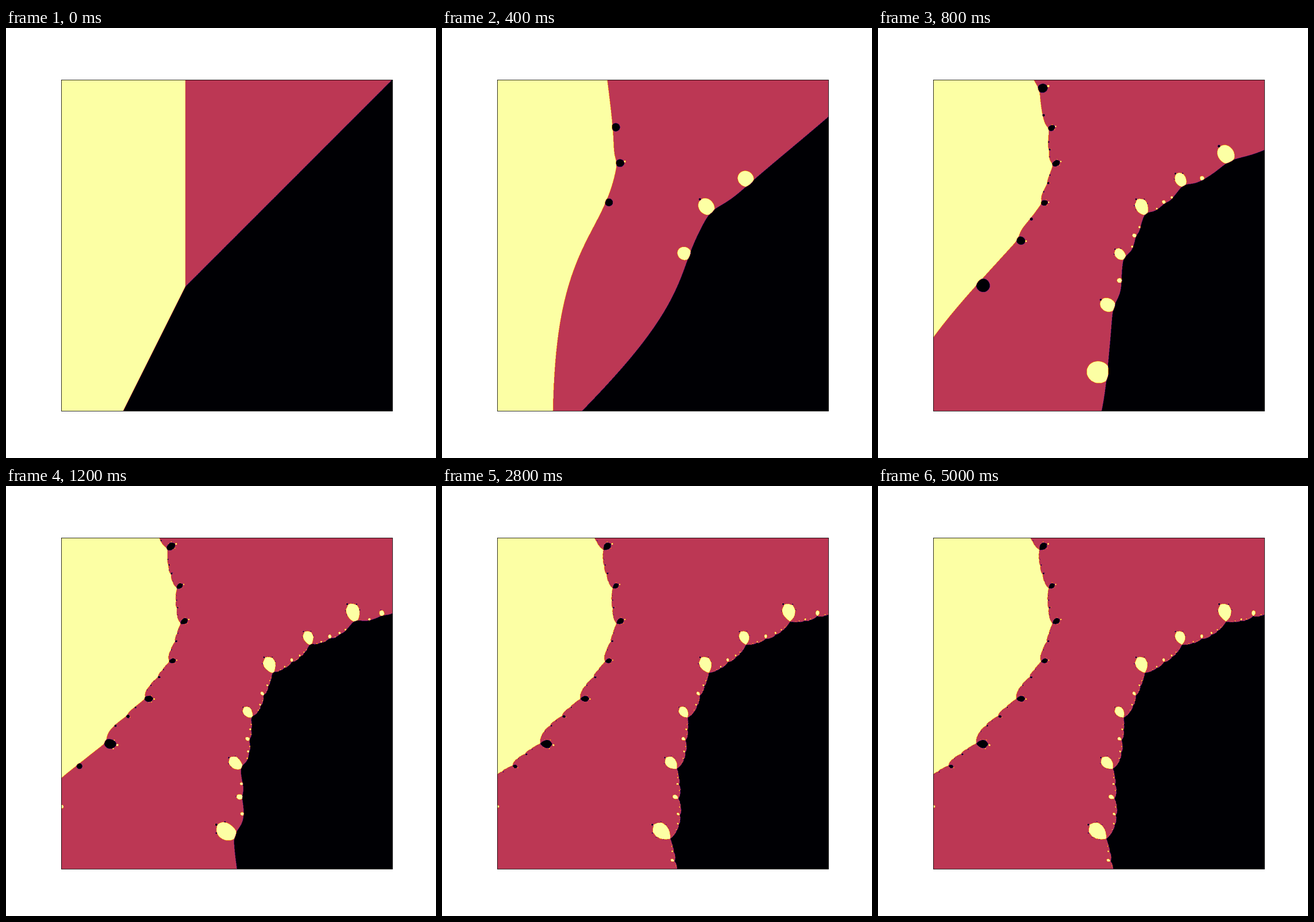
An HTML page with a canvas for the animation above (6 s loop, 748 px wide and 748 px high).

```html
<!DOCTYPE html>
<html lang="en">
<head>
<meta charset="utf-8">
<title>Newton fractal</title>
<style>
  html, body { margin: 0; width: 100%; height: 100%; overflow: hidden; background: #fff; }
  canvas { display: block; }
</style>
</head>
<body>
<canvas id="stage" width="748" height="748"></canvas>
<script>
const STEP_MS = 200, LOOP_MS = 6000, LAST_STEP = 25;
const GRID = 1000, SIZE = 576, LEFT = 96, TOP = 90;

// Roots of the cubic, each with its value on the colour scale.
const roots = [
  { x: 1, y: 0, value: 0 },
  { x: 0, y: 1, value: 0.5 },
  { x: -1, y: 1, value: 1 }
];

const stops = ["000004", "210c4a", "57106e", "8a226a", "bc3754", "e35933", "f98e09", "f9cb35", "fcffa4"]
  .map(hex => [0, 2, 4].map(i => parseInt(hex.slice(i, i + 2), 16)));

const palette = Array.from({ length: 257 }, (_, i) => {
  const pos = i / 32, low = Math.min(7, Math.floor(pos)), mix = pos - low;
  return stops[low].map((c, k) => Math.round(c + (stops[low + 1][k] - c) * mix));
});

// Orbit of every grid point; only unsettled points keep moving.
const zx = new Float64Array(GRID * GRID);
const zy = new Float64Array(GRID * GRID);
const values = new Float32Array(GRID * GRID);
let active = new Uint32Array(GRID * GRID);
for (let i = 0; i < active.length; i++) {
  active[i] = i;
  zx[i] = -2 + 4 * (i % GRID) / (GRID - 1);
  zy[i] = 2 - 4 * Math.floor(i / GRID) / (GRID - 1);
}

// Give each point the value of its nearest root and drop those close to one.
function classify() {
  let kept = 0;
  for (let a = 0; a < active.length; a++) {
    const i = active[a];
    let best = Infinity;
    for (let k = 0; k < 3; k++) {
      const r = roots[k], dx = zx[i] - r.x, dy = zy[i] - r.y, d = dx * dx + dy * dy;
      if (d < best) { best = d; values[i] = r.value; }
    }
    if (best > 0.01) active[kept++] = i;
  }
  active = active.subarray(0, kept);
}

// One Newton step: z - p/p', where p'/p is the sum of 1/(z - root).
function advance() {
  for (let a = 0; a < active.length; a++) {
    const i = active[a];
    let sx = 0, sy = 0;
    for (let k = 0; k < 3; k++) {
      const r = roots[k], dx = zx[i] - r.x, dy = zy[i] - r.y, d = dx * dx + dy * dy;
      sx += dx / d;
      sy -= dy / d;
    }
    const s = sx * sx + sy * sy;
    zx[i] -= sx / s;
    zy[i] += sy / s;
  }
}

// Hann-window weights for shrinking the grid to the plot size.
const ratio = GRID / SIZE;
const taps = Array.from({ length: SIZE }, (_, p) => {
  const centre = (p + 0.5) * ratio - 0.5;
  const first = Math.max(0, Math.ceil(centre - ratio));
  const last = Math.min(GRID - 1, Math.floor(centre + ratio));
  const weights = [];
  for (let i = first; i <= last; i++) {
    weights.push(0.5 + 0.5 * Math.cos(Math.PI * (i - centre) / ratio));
  }
  const total = weights.reduce((a, b) => a + b);
  return { first, weights: weights.map(w => w / total) };
});

const rows = new Float32Array(GRID * SIZE);

function renderPlot() {
  for (let y = 0; y < GRID; y++) {
    for (let x = 0; x < SIZE; x++) {
      const { first, weights } = taps[x];
      let sum = 0;
      for (let k = 0; k < weights.length; k++) sum += weights[k] * values[y * GRID + first + k];
      rows[y * SIZE + x] = sum;
    }
  }
  const image = new ImageData(SIZE, SIZE);
  for (let y = 0, out = 0; y < SIZE; y++) {
    const { first, weights } = taps[y];
    for (let x = 0; x < SIZE; x++, out += 4) {
      let sum = 0;
      for (let k = 0; k < weights.length; k++) sum += weights[k] * rows[(first + k) * SIZE + x];
      const colour = palette[Math.round(sum * 256)];
      image.data[out] = colour[0];
      image.data[out + 1] = colour[1];
      image.data[out + 2] = colour[2];
      image.data[out + 3] = 255;
    }
  }
  return image;
}

const plots = [];

function plotAt(step) {
  while (plots.length <= step) {
    if (plots.length) advance();
    classify();
    plots.push(renderPlot());
  }
  return plots[step];
}

const ctx = document.getElementById("stage").getContext("2d");
let shown = -1;

function draw(time) {
  const step = Math.min(LAST_STEP, Math.floor((time % LOOP_MS) / STEP_MS));
  if (step === shown) return;
  shown = step;
  ctx.fillStyle = "#fff";
  ctx.fillRect(0, 0, 748, 748);
  ctx.putImageData(plotAt(step), LEFT, TOP);
  ctx.lineWidth = 0.8;
  ctx.strokeStyle = "#000";
  ctx.strokeRect(LEFT + 0.5, TOP + 0.5, SIZE, SIZE);
}

const start = performance.now();
function tick() {
  draw(performance.now() - start);
  requestAnimationFrame(tick);
}
draw(0);
requestAnimationFrame(tick);
</script>
</body>
</html>
```
